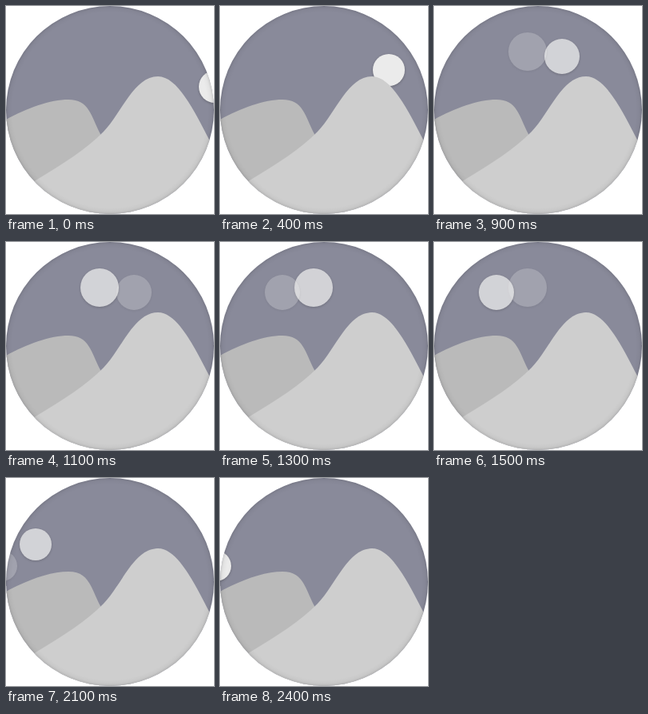
Animation, 260 px wide and 260 px high, one loop 2.5 s. Source, as an HTML page:

```html
<!DOCTYPE html>
<html lang="en">
<head>
<meta charset="utf-8">
<title>Moon over hills</title>
<style>
html, body { margin: 0; width: 100%; height: 100%; overflow: hidden; background: #fff; }
svg { display: block; width: 260px; height: 260px; }
.moon { fill: #ebebeb; filter: drop-shadow(0.5px 1px 1.5px rgba(0, 0, 0, .25)); }
</style>
</head>
<body>
<svg viewBox="0 0 260 260">
  <defs>
    <clipPath id="disc"><circle cx="130" cy="130" r="130"/></clipPath>
    <radialGradient id="rim" gradientUnits="userSpaceOnUse" cx="130" cy="130" r="130">
      <stop offset=".94" stop-opacity="0"/>
      <stop offset=".975" stop-opacity=".03"/>
      <stop offset="1" stop-opacity=".12"/>
    </radialGradient>
  </defs>
  <g clip-path="url(#disc)">
    <rect width="260" height="260" fill="#898a9a"/>
    <g id="moons"></g>
    <path fill="#bababa" d="M-2 143C25 128 55 117 78 117C104 117 106 137 118 160V260H-2Z"/>
    <path fill="#cecece" d="M20 228L37 218C70 198 102 178 122 157C145 133 160 88 190 88C214 88 235 130 254 167L264 187V260H20Z"/>
    <circle cx="130" cy="130" r="130" fill="url(#rim)"/>
  </g>
</svg>
<script>
const LOOP = 2500, STEP = 100, FADE = 400;
// x, y, radius of each moon along the arc
const spots = [
  [261, 101, 20], [211, 80, 20], [160, 63, 22], [117, 57, 24],
  [78, 63, 22], [37, 83, 20], [-5, 110, 19]
];
const moons = spots.map(([cx, cy, r]) => {
  const moon = document.createElementNS('http://www.w3.org/2000/svg', 'circle');
  for (const [name, value] of Object.entries({ cx, cy, r, class: 'moon' })) {
    moon.setAttribute(name, value);
  }
  return document.getElementById('moons').appendChild(moon);
});

const start = performance.now();

// Neighbouring moons cross-fade, one every FADE ms
function draw() {
  const elapsed = (performance.now() - start) % LOOP;
  const time = Math.floor(elapsed / STEP) * STEP;
  moons.forEach((moon, i) => {
    moon.style.opacity = Math.max(0, 1 - Math.abs(time / FADE - i));
  });
  requestAnimationFrame(draw);
}
draw();
</script>
</body>
</html>
```
